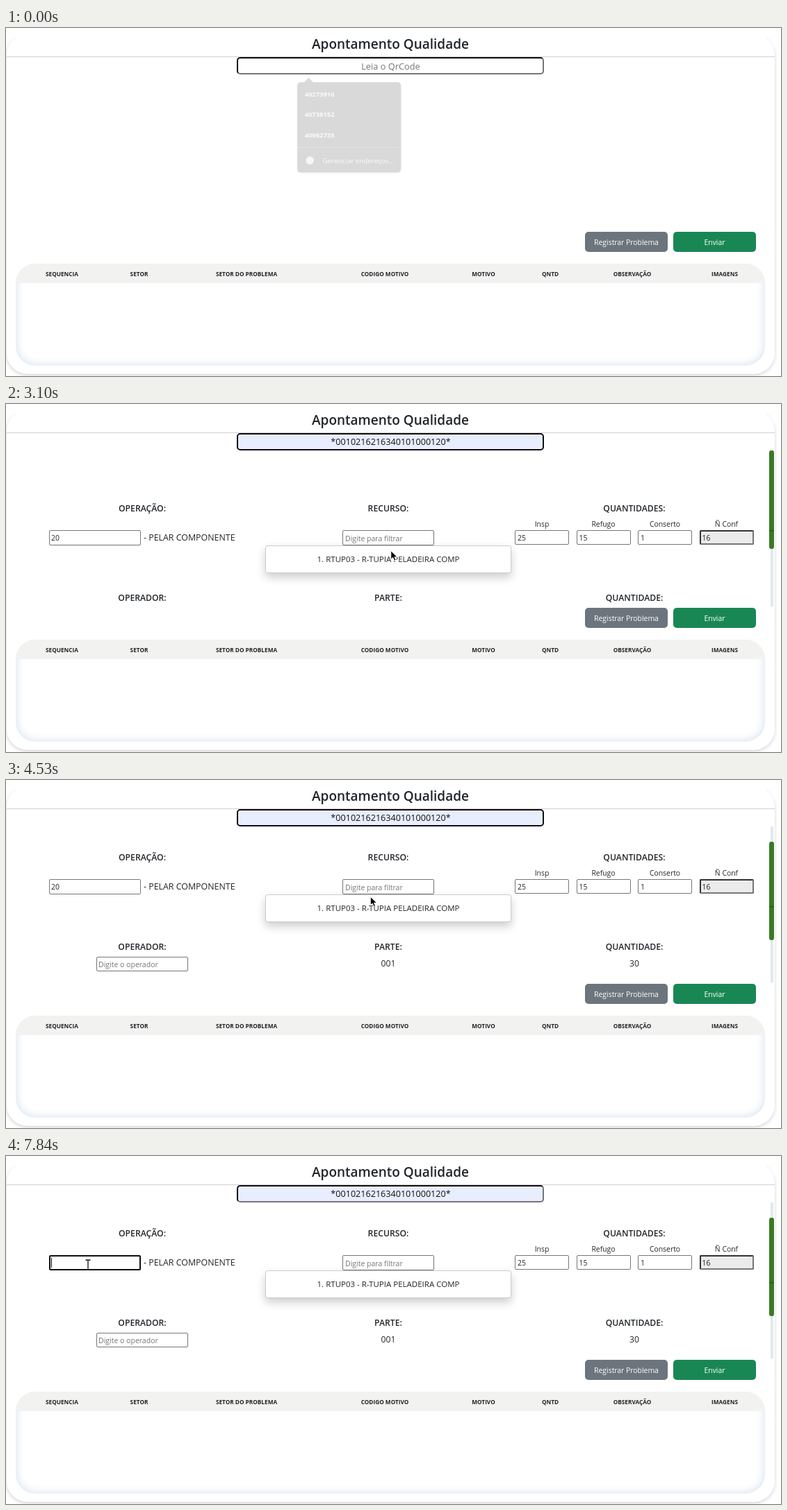
These frames come from a looping animation (1115 by 502 pixels, 8 s). An HTML page:

```html
<!DOCTYPE html>
<html lang="pt-BR">
<head>
<meta charset="utf-8">
<title>Apontamento Qualidade</title>
<style>
html, body { margin: 0; width: 100%; height: 100%; overflow: hidden; background: #fff; }
body { position: relative; font-family: "Open Sans", "Noto Sans", sans-serif; color: #212529; }
div, svg { position: absolute; box-sizing: border-box; }
.t { line-height: 1; white-space: pre; transform: translate(-50%, -50%); }
.t.l { transform: translateY(-50%); }
#card { left: 1px; top: 9px; width: 1105px; height: 490px; border-radius: 30px; box-shadow: 0 2px 5px rgba(0,0,0,.17); }
#lid { left: 0; top: 0; width: 1115px; height: 14px; background: #fff; }
#rule { left: 1px; top: 41px; width: 1105px; height: 1px; background: #cfcfcf; }
#qr { left: 332px; top: 42px; width: 442px; height: 25px; border: 2px solid #767676; border-color: #111 #767676 #767676 #111; border-radius: 5px; }
#qr.focus { border-color: #101010; }
#clip { left: 0; top: 67px; width: 1115px; height: 227px; overflow: hidden; }
.in { border: 1px solid #767676; border-radius: 2px; background: #fff; }
.in.focus { border: 2px solid #101010; }
.in.off { border: 2px solid; border-color: #333 #767676 #767676 #333; background: #ebebeb; }
#drop { left: 373px; top: 165px; width: 354px; height: 40px; border: 1px solid #ccc; border-radius: 3px; box-shadow: 0 6px 13px rgba(0,0,0,.2); }
#track { left: 1100px; top: 67px; width: 4px; height: 225px; background: #dfeaec; }
#thumb { left: 1098px; width: 7px; height: 142px; border-radius: 3px; background: #3a7a22; }
#notch { left: 1098px; top: 182px; width: 7px; height: 2px; background: #2c5f1b; }
.btn { top: 294px; width: 119px; height: 29px; border-radius: 5px; }
#table { left: 14px; top: 340px; width: 1078px; height: 147px; border-radius: 28px; overflow: hidden; box-shadow: inset 0 0 14px #cfdfec; }
#head { left: 0; top: 0; width: 100%; height: 28px; background: #f2f2f0; }
.pop { left: 416px; top: 75px; border-radius: 5px; background: #1a1b20; transform-origin: 45% 55%; box-shadow: 0 1px 4px rgba(0,0,0,.4); color: #e3e3e3; }
.pop::before { content: ""; position: absolute; left: 9px; top: -7px; border: 8px solid transparent; border-top: 0; border-bottom: 8px solid #1a1b20; }
.caret { width: 1px; background: #111; }
#ptr { left: 0; top: 0; overflow: visible; }
</style>
</head>
<body>
<script>
const text = (x, y, size, str, weight = 400, more = "", cls = "") =>
  `<div class="t ${cls}" style="left:${x}px;top:${y}px;font-size:${size}px;font-weight:${weight};${more}">${str}</div>`;
const left = (x, y, size, str, weight, more) => text(x, y, size, str, weight, more, "l");
const box = (x, y, w, h, id = "", cls = "in") =>
  `<div id="${id}" class="${cls}" style="left:${x}px;top:${y}px;width:${w}px;height:${h}px"></div>`;
const grey = "color:#757575";
const code = "*0010216216340101000120*";
const columns = { SEQUENCIA: 80.5, SETOR: 191.5, "SETOR DO PROBLEMA": 346, "CODIGO MOTIVO": 545,
  MOTIVO: 687, QNTD: 783, "OBSERVAÇÃO": 901, IMAGENS: 1034 };
const titles = [[112, "OPERAÇÃO:", "RECURSO:", "QUANTIDADES:"],
  [241, "OPERADOR:", "PARTE:", "QUANTIDADE:"],
  [350.5, "CENTRO DE CUSTO:", "PRODUTO:", "CENTRO DE TRABALHO:"]];
const amounts = [["Insp", 25], ["Refugo", 15], ["Conserto", 1], ["Ñ Conf", 16]];

const form = titles.map(([y, ...row]) => row.map((s, i) => text(196 + 354 * i, y, 12.2, s, 600)).join("")).join("") +
  box(62, 143, 132, 22, "op") + `<div id="opText">${left(65, 153.5, 10.5, "20")}</div>` +
  left(198, 153.5, 12.4, "- PELAR COMPONENTE") +
  box(484, 143, 132, 22, "res") + left(488, 155, 10.5, "Digite para filtrar", 400, grey) +
  amounts.map(([name, n], i) => {
    const x = 732 + 88.5 * i;
    return text(x + 39, 134, 10.4, name) + box(x, 143, 78, 21, "", i > 2 ? "in off" : "in") +
      `<div class="amount">${left(x + 4, 153.5, 10.5, n)}</div>`;
  }).join("") +
  box(130, 255, 132, 21) + left(133, 266, 10.5, "Digite o operador", 400, grey) +
  text(550, 265, 12.2, "001") + text(904, 265, 12.2, "30") +
  `<div id="drop">${text(176, 19, 11.5, "1. RTUP03 - R-TUPIA PELADEIRA COMP")}</div>`;

document.body.innerHTML = `
<div id="card"></div><div id="lid"></div><div id="rule"></div>
${text(553, 22.6, 19, "Apontamento Qualidade", 600)}
<div id="form"><div id="clip"><div id="inner">${form}</div></div>
  <div id="track"></div><div id="thumb"></div><div id="notch"></div></div>
<div id="qr"></div>${text(553.5, 55, 12.8, "<span id=qrText></span>")}
<div class="btn" style="left:833px;background:#6c757d"></div>
<div class="btn" style="left:960px;background:#198754"></div>
${text(892.5, 308.5, 10.4, "Registrar Problema", 400, "color:#fff")}
${text(1019.5, 308.5, 10.4, "Enviar", 400, "color:#fff")}
<div id="table"><div id="head"></div></div>
${Object.entries(columns).map(([s, x]) => text(x, 354.5, 8.25, s, 700)).join("")}
<div class="pop" id="pop1" style="width:156px;height:136px">
  ${["40273916", "40738152", "40962735"].map((s, i) => left(11, 18.5 + 30.7 * i, 9.85, s, 700)).join("")}
  <div style="left:0;top:98px;width:100%;height:1px;background:#55565a"></div>
  <div style="left:13px;top:112px;width:12px;height:12px;border-radius:6px;background:#c8cacd"></div>
  ${left(38, 118, 10.3, "Gerenciar endereços...")}
</div>
<div class="pop" id="pop2" style="width:179px;height:68px">
  <div id="hover" style="left:4px;top:3px;width:171px;height:30px;background:#33343a;border-radius:3px">${text(156, 15, 15, "×")}</div>
  ${left(11, 18.5, 9.75, code, 700)}${left(11, 49, 9.75, "*0010216216340101000110*", 700)}
</div>
<div id="caret" class="caret" style="top:46px;height:17px"></div>
<div id="fieldCaret" class="caret" style="top:147px;height:14px"></div>
<svg id="ptr" width="1" height="1"><path id="shape"/></svg>`;

const $ = id => document.getElementById(id);
const show = (el, on) => el.style.visibility = on ? "visible" : "hidden";
const ramp = (t, a, b) => Math.min(1, Math.max(0, (t - a) / (b - a)));

const shapes = {
  arrow: "M0 0V12L2.8 9.5L5 14L7 13L5 8.8H8.8Z",
  beam: "M-3.5-7H-1L0-6L1-7H3.5M0-6V6M-3.5 7H-1L0 6L1 7H3.5",
  hand: "M-2-8Q-.5-10 1-8V-2L6.5 0Q8.5 1 8 4L6.5 9.5H-.5L-6 3Q-7 0-4 1L-2 2.5Z"
};
// time, x, y, and the pointer shape used from then on
const moves = [
  [20, 1050, 470, "arrow"], [780, 610, 66, "beam"], [900, 610, 64, "beam"], [990, 603, 59, "beam"],
  [1960, 603, 59, "arrow"], [2120, 483, 87, "arrow"], [2730, 483, 87, "arrow"],
  [3200, 563, 228, "hand"], [3690, 563, 228, "arrow"], [4150, 516, 169, "arrow"], [4390, 516, 169, "arrow"],
  [4900, 561, 166, "beam"], [5400, 561, 166, "beam"], [5650, 570, 184, "hand"],
  [5970, 570, 184, "arrow"], [6350, 1043, 125, "arrow"], [6780, 118, 157, "arrow"], [7140, 118, 157, "beam"]
];
const scrolls = [[0, 0], [3490, 0], [3645, 67], [3675, 67], [3780, 112], [4090, 112], [4155, 93], [4185, 93], [4350, 39]];

function along(keys, t, smooth) {
  const i = keys.findLastIndex(k => k[0] <= t);
  const a = keys[Math.max(i, 0)], b = keys[i + 1] || a;
  let f = ramp(t, a[0], b[0] + .001);
  if (smooth) f = f * f * (3 - 2 * f);
  return a.map((v, j) => typeof v == "number" ? v + (b[j] - v) * f : v);
}

function popup(id, o) {
  $(id).style.opacity = o;
  $(id).style.transform = `scale(${.947 + .053 * o})`;
}

function draw(t) {
  popup("pop1", t < 800 ? .16 * (1 - ramp(t, 20, 80)) : ramp(t, 890, 990) * (1 - ramp(t, 1465, 1510)));
  popup("pop2", ramp(t, 1465, 1510) * (1 - ramp(t, 2410, 2540)));
  show($("hover"), t >= 2080);

  const filled = t >= 2080, typed = t >= 1130, focus = t >= 790 && t < 4960;
  $("qr").className = focus ? "focus" : "";
  $("qr").style.background = filled ? "#e8eefe" : "#fff";
  const label = $("qrText");
  label.textContent = filled ? code : typed ? "*" : "Leia o QrCode";
  label.style.color = typed ? "#111" : "#757575";
  label.style.fontSize = filled ? "12.6px" : "12.8px";
  $("caret").style.left = (filled ? 639 : typed ? 555 : 553) + "px";
  show($("caret"), focus && (t < 2440 || (t - 2440) % 1060 < 530));

  const scroll = Math.round(along(scrolls, t)[1]);
  $("form").style.display = t >= 2560 ? "" : "none";
  $("inner").style.transform = `translateY(${-28 - scroll}px)`;
  $("thumb").style.top = 89 + .56 * (scroll - 39) + "px";
  document.querySelectorAll(".amount").forEach(el => show(el, t >= 2730));
  $("drop").style.opacity = t < 5100 ? ramp(t, 2730, 2850) * (1 - ramp(t, 4920, 5040)) : ramp(t, 5400, 5520);
  $("drop").style.background = t > 3150 && t < 3700 || t > 5620 && t < 6010 ? "#efefef" : "#fff";

  const onRes = t >= 4960 && t < 6750, onOp = t >= 6750;
  $("res").className = onRes ? "in focus" : "in";
  $("op").className = onOp ? "in focus" : "in";
  const digits = t < 2730 || t >= 7840 ? 0 : t < 7660 ? 2 : 1;
  $("opText").firstChild.textContent = "20".slice(0, digits);
  $("fieldCaret").style.left = (onRes ? 487 : 65 + 6 * digits) + "px";
  show($("fieldCaret"), onRes && (t - 4960) % 1060 < 530 || t >= 7340);

  const [, x, y, kind] = along(moves, t, true);
  const beam = kind == "beam";
  show($("ptr"), t >= 20);
  $("ptr").style.transform = `translate(${x}px,${y}px)`;
  $("shape").setAttribute("d", shapes[kind]);
  $("shape").setAttribute("style", beam ? "fill:none;stroke:#111;stroke-width:1.3" : "fill:#000;stroke:#fff;stroke-width:.8");
}

const start = performance.now();
function tick() {
  draw((performance.now() - start) % 8000);
  requestAnimationFrame(tick);
}
tick();
</script>
</body>
</html>
```
